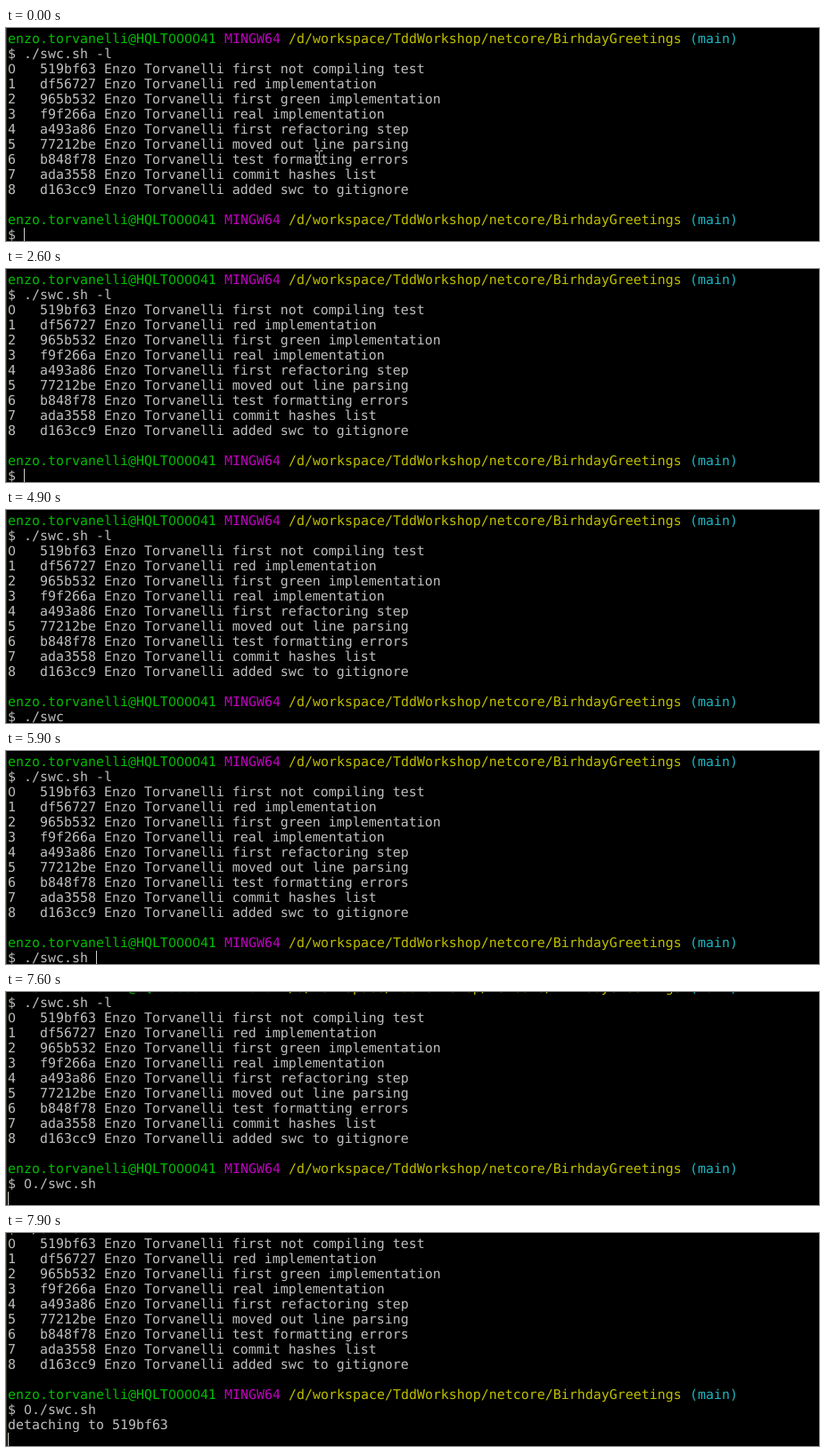
An HTML page for the animation above (8 s loop, 912 px wide and 240 px high).

```html
<!DOCTYPE html>
<html lang="en">
<head>
<meta charset="utf-8">
<title>Terminal</title>
<style>
  html, body { margin: 0; width: 100%; height: 100%; overflow: hidden; background: #000; }
  svg { display: block; }
  text {
    font: 14.949px "DejaVu Sans Mono", monospace;
    fill: #bfbfbf;
    white-space: pre;
    text-rendering: geometricPrecision;
  }
  .zero { font: 14.146px "DejaVu Sans", sans-serif; }
  .user { fill: #00bf00; }
  .system { fill: #bf00bf; }
  .path { fill: #bfbf00; }
  .branch { fill: #1cb4c0; }
</style>
</head>
<body>
<svg width="912" height="240" viewBox="0 0 912 240">
  <rect width="912" height="240"/>
  <g id="screen"></g>
  <rect width="1" height="240" fill="#33332a"/>
  <rect id="caret" y="225" width="1" height="15" fill="#cfcfcf"/>
  <path id="pointer" d="M-4 -7.5H-1M1 -7.5H4M0 -7V7M-4 7.5H-1M1 7.5H4" fill="none" stroke="#d8d8d8"/>
</svg>
<script>
const LOOP = 8000, CELL = 9, LINE = 17, LEFT = 2;
const STROKE = 100, BLINK = 475, WAKE = 700, ENTER = 7600, OUTPUT_DELAY = 200;
const POINTER_MOVE = 300, POINTER_HIDE = 2600;

const AUTHOR = "Enzo Torvanelli";
const LOG = `519bf63 first not compiling test
df56727 red implementation
965b532 first green implementation
f9f266a real implementation
a493a86 first refactoring step
77212be moved out line parsing
b848f78 test formatting errors
ada3558 commit hashes list
d163cc9 added swc to gitignore`.split("\n");

const PROMPT = {
  user: "enzo.torvanelli@HQLT000041",
  system: "MINGW64",
  path: "/d/workspace/TddWorkshop/netcore/BirhdayGreetings",
  branch: "(main)"
};

// Bursts of typing and when each begins
const BURSTS = { "./s": 3100, "w": 3800, "c": 4400, ".": 5200, "sh": 5400, " ": 5900, "0": 7000 };
const strokes = Object.entries(BURSTS).flatMap(([keys, start]) =>
  [...keys].map((key, i) => ({ key, time: start + i * STROKE })));

const byId = id => document.getElementById(id);
const screen = byId("screen"), caret = byId("caret"), pointer = byId("pointer");

const plainZeros = s => s.replace(/0/g, '<tspan class="zero">0</tspan>');

function addLine(row, html = "") {
  const line = document.createElementNS("http://www.w3.org/2000/svg", "text");
  line.setAttribute("x", LEFT);
  line.setAttribute("y", LINE * (row + 1));
  line.innerHTML = html;
  screen.append(line);
  return line;
}

function addPrompt(row) {
  let column = 0;
  addLine(row, Object.entries(PROMPT).map(([kind, word]) => {
    const x = LEFT + column * CELL;
    column += word.length + 1;
    return `<tspan class="${kind}" x="${x}">${plainZeros(word)}</tspan>`;
  }).join(""));
}

addPrompt(0);
addLine(1, "$ ./swc.sh -l");
LOG.forEach((entry, i) =>
  addLine(i + 2, plainZeros(`${i}   ${entry.replace(" ", ` ${AUTHOR} `)}`)));
addPrompt(12);
const input = addLine(13);
const output = addLine(14, "detaching to 519bf63");

function drawText(t) {
  const typed = strokes.filter(stroke => stroke.time <= t);
  const scrolled = t < ENTER ? 0 : t < ENTER + OUTPUT_DELAY ? 1 : 2;
  input.innerHTML = plainZeros("$ " + typed.map(stroke => stroke.key).join(""));
  output.setAttribute("opacity", scrolled > 1 ? 1 : 0);
  screen.setAttribute("transform", `translate(0 ${-LINE * scrolled})`);

  // Every key press restarts the blinking with a lit caret
  const lastKey = scrolled ? ENTER : typed.at(-1)?.time ?? WAKE;
  const lit = Math.floor((t - lastKey) / BLINK) % 2 === 0;
  caret.setAttribute("x", LEFT + (scrolled ? 0 : typed.length + 2) * CELL);
  caret.setAttribute("opacity", lit ? 1 : 0);
}

function drawPointer(t) {
  const p = Math.min(t / POINTER_MOVE, 1);
  const eased = p * (2 - p);
  pointer.setAttribute("transform", `translate(${351.5 - 30 * eased} ${146 - 2 * eased})`);
  pointer.setAttribute("opacity", t < POINTER_HIDE ? 1 : 0);
}

const start = performance.now();
function tick() {
  const t = (performance.now() - start) % LOOP;
  drawText(t);
  drawPointer(t);
  requestAnimationFrame(tick);
}
tick();
</script>
</body>
</html>
```
